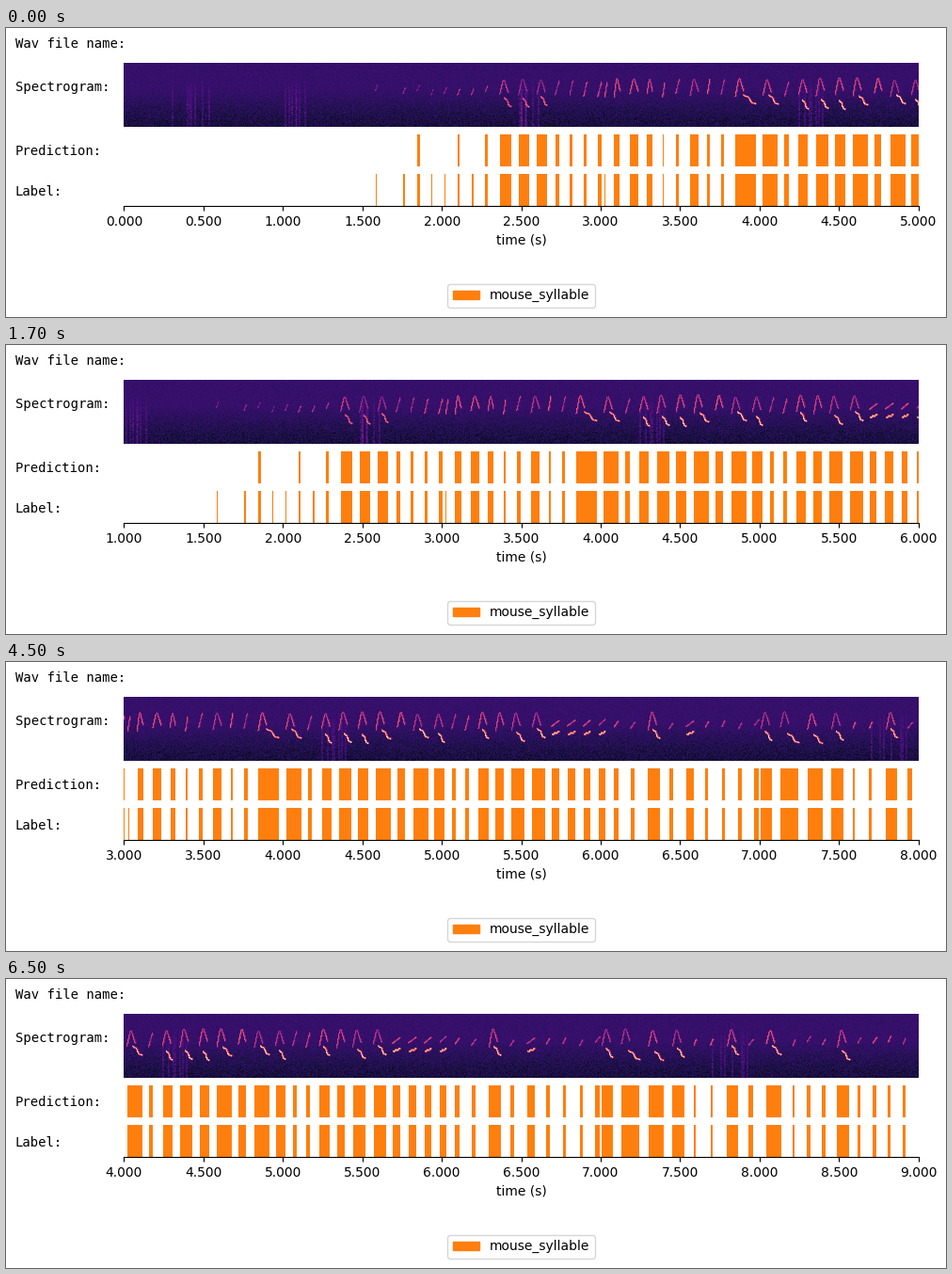
Write a matplotlib script that moves like this. It is 999 by 307 pixels and loops after 8000 ms.

```python
import numpy as np
import matplotlib.pyplot as plt
from matplotlib.animation import FuncAnimation
from matplotlib.patches import Patch
from matplotlib.ticker import FormatStrFormatter, MultipleLocator

W, H, DPI = 999, 307, 100
LEFT, WIDTH = 125.45, 844.35
PX_PER_S, DURATION, WINDOW = 169, 9, 5
TOP, ROWS = 37, 68
ORANGE = "#ff7f0e"

plt.rcParams["font.family"] = "DejaVu Sans"

# Phrases of calls in ms: first onset, last onset, call lengths.
PHRASES = [
    (1583, 1583, [6]),
    (1757, 2273, [11, 17, 6, 6, 13, 11, 16]),
    (2365, 2981, [71, 64, 64, 26, 19, 20, 23]),
    (3025, 3025, [6]),
    (3084, 3846, [37, 52, 34, 11, 22, 54, 15, 20, 130]),
    (4020, 4822, [94, 25, 60, 77, 63, 93, 46, 95]),
    (4954, 5440, [63, 24, 23, 63, 50, 80]),
    (5570, 6084, [80, 46, 49, 41, 40, 26]),
    (6189, 6867, [25, 75, 24, 48, 20, 17, 19]),
    (6966, 7008, [29, 68]),
    (7130, 7796, [114, 94, 74, 11, 15, 68]),
    (7930, 8041, [29, 94]),
    (8208, 8901, [9, 23, 20, 77, 20, 25, 15, 16]),
]


def phrase_calls(first, last, lengths):
    """Longer calls are followed by shorter pauses, scaled to fill the phrase."""
    before = np.array(lengths[:-1], float)
    pauses = np.maximum(44, 76 - .4 * before)
    if len(before):
        pauses *= (last - first - before.sum()) / pauses.sum()
    onsets = first + np.concatenate([[0], np.cumsum(before + pauses)])
    return list(zip(onsets, lengths))


CALLS = [call for phrase in PHRASES for call in phrase_calls(*phrase)]
PREDICTED = [(onset, length) for onset, length in CALLS
             if length > 11 or onset > 3100]


def stroke(layer, ms, heights, level):
    cols = np.clip((ms * PX_PER_S / 1000).astype(int), 0, layer.shape[1] - 1)
    y = heights - TOP
    for offset in (-1, 0, 1):
        rows = np.round(y).astype(int) + offset
        np.maximum.at(layer, (rows, cols), level * np.exp(-(rows - y) ** 2))


def draw_call(layer, rng, onset, length):
    u = np.linspace(0, 1, 120)
    level = np.interp(onset, [1500, 2300, 3000], [.3, .42, .52])
    shade = level + rng.uniform(-.05, .1) + .06 * np.sin(9 * u)
    late = onset > 5600
    paired = late and 40 <= length < 50

    if length > 30 and not paired:
        top, bottom = rng.uniform(52, 55), rng.uniform(68, 73)
        heights = np.interp(u, [0, .38, .55, 1],
                            [bottom, top + 1, top, top + 13])
        stroke(layer, onset + min(length, 52) * u, heights, shade)
    else:
        high = 2300 < onset < 5600
        top = rng.uniform(54, 58) if high else rng.uniform(60, 65)
        bottom = top + (15 if high else 6)
        stroke(layer, onset + max(length, 14) * u, bottom + (top - bottom) * u,
               shade)

    if length >= 60 or paired:
        bright = np.interp(onset, [2300, 4300], [.7, .95])
        ease = u * u * (3 - 2 * u)
        first = 76 if paired else rng.uniform(70, 77)
        drop = -2 if paired else 10
        begin = .1 if paired else .4
        heights = first + drop * ease + .8 * np.sin(12 * u)
        stroke(layer, onset + length * (begin + (1 - begin) * u), heights,
               bright - .12 * np.cos(8 * u) ** 2)


def make_spectrogram():
    rng = np.random.default_rng(4)
    shape = (ROWS, DURATION * PX_PER_S)
    depth = np.linspace(0, 1, ROWS)[:, None]
    low = np.clip((depth - .42) / .5, 0, 1)
    spec = .19 - .07 * low + rng.normal(size=shape) * (.011 + .018 * low)

    # Bursts of broadband clicks, around a few moments in seconds.
    for center in (.45, 1.07, 2.51, 4.32, 7.83):
        for second in rng.normal(center, .05, 7):
            col = int(second * PX_PER_S)
            fade = np.clip(depth * 2.2 - .5, 0, 1)
            spec[:, col:col + 2] += fade * rng.uniform(.02, .12, (ROWS, 1))

    layer = np.zeros(shape)
    for onset, length in CALLS:
        draw_call(layer, rng, onset, length)
    layer = np.maximum(layer, .55 * np.roll(layer, 1, axis=1))
    layer *= rng.uniform(.85, 1.05, shape)
    return np.maximum(spec, layer)


fig = plt.figure(figsize=(W / DPI, H / DPI), dpi=DPI, facecolor="white")


def add_axes(top, height):
    return fig.add_axes([LEFT / W, 1 - (top + height) / H, WIDTH / W, height / H])


def draw_bars(ax, calls):
    spans = [(onset / 1000, length / 1000) for onset, length in calls]
    ax.broken_barh(spans, (0, 1), facecolors=ORANGE, linewidth=0, snap=True)
    ax.set_ylim(0, 1)


unit = 152 / 18
spec_ax = add_axes(TOP, ROWS)
pred_ax = add_axes(36.84 + 9 * unit, 4 * unit)
label_ax = add_axes(36.84 + 14 * unit, 4 * unit)

spec_ax.imshow(make_spectrogram(), cmap="magma", vmin=0, vmax=1, aspect="auto",
               interpolation="nearest", extent=(0, DURATION, ROWS, 0))
draw_bars(pred_ax, PREDICTED)
draw_bars(label_ax, CALLS)
spec_ax.axis("off")
pred_ax.axis("off")

label_ax.set_yticks([])
label_ax.spines[["left", "right", "top"]].set_visible(False)
label_ax.xaxis.set_major_locator(MultipleLocator(.5))
label_ax.xaxis.set_major_formatter(FormatStrFormatter("%.3f"))
label_ax.set_xlabel("time (s)")
label_ax.legend(handles=[Patch(color=ORANGE, label="mouse_syllable")],
                loc="upper center", bbox_to_anchor=(.5, -2.25))

for text, baseline in [("Wav file name:", 21), ("Spectrogram:", 67),
                       ("Prediction:", 135), ("Label:", 178)]:
    fig.text(.01, 1 - baseline / H, text, family="DejaVu Sans Mono", size=10)


def update(frame):
    start = (frame + 3) // 4
    for ax in (spec_ax, pred_ax, label_ax):
        ax.set_xlim(start, start + WINDOW)
    return []


anim = FuncAnimation(fig, update, frames=16, interval=500, repeat=True,
                     repeat_delay=0, blit=False)
plt.show()
```
